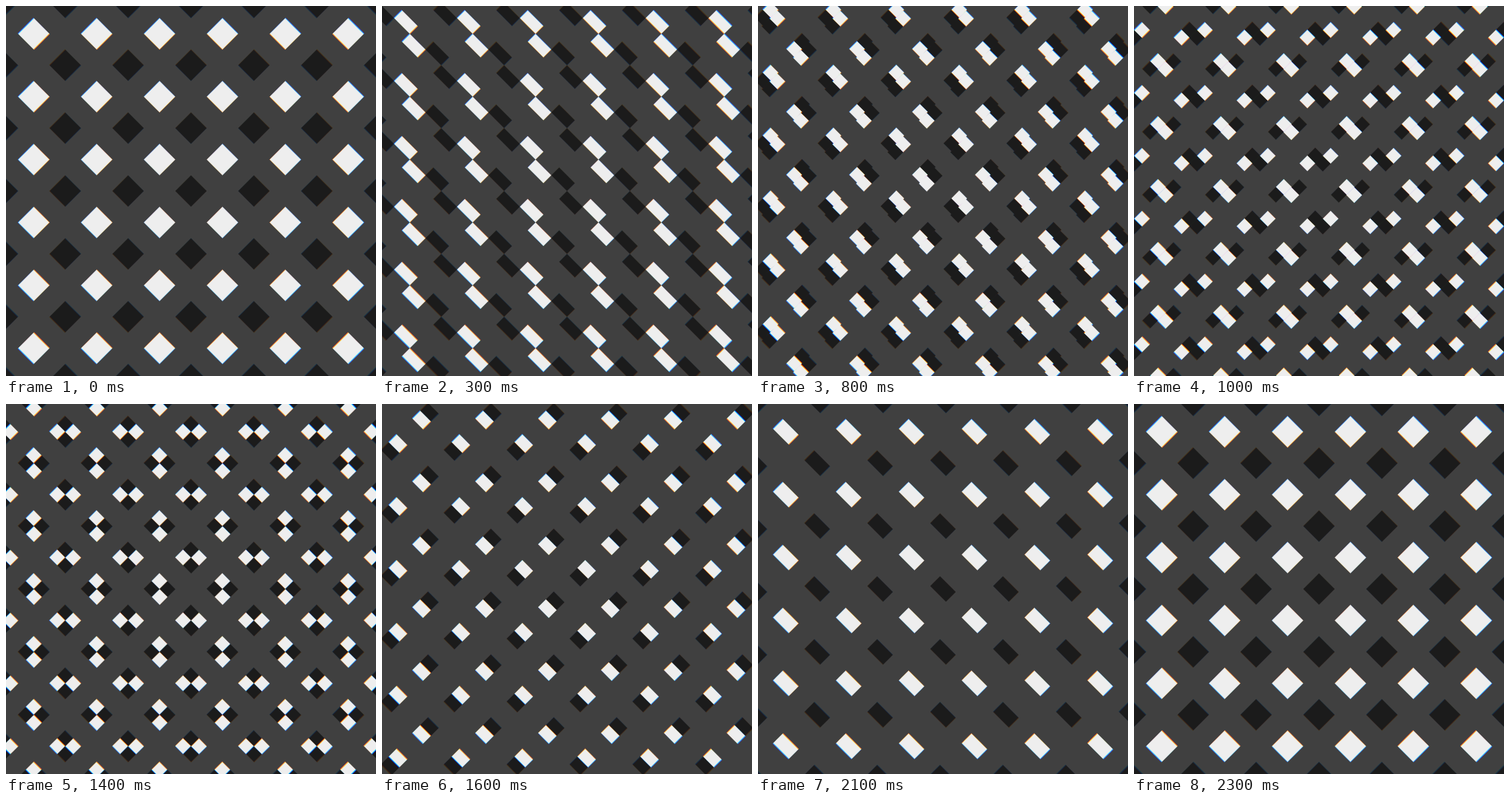
Recreate the animation shown at these times as an HTML page with a canvas. Size 500 by 500 pixels, loop 2400 ms.

```html
<!DOCTYPE html>
<html lang="en">
<head>
<meta charset="utf-8">
<title>Shifting squares</title>
<style>
  html, body { margin: 0; width: 100%; height: 100%; overflow: hidden; background: #404040; }
  canvas { display: block; width: 500px; height: 500px; }
</style>
</head>
<body>
<canvas id="stage" width="500" height="500"></canvas>
<script>
const ctx = document.getElementById('stage').getContext('2d');
const LOOP = 2400, STEP = 100;
const UNIT = 10.625 * Math.SQRT2;   // side of a quarter square
const REACH = 8;                    // lattice cells each way from the middle

// Each phase: start and end, in steps
const PHASES = [[0, 6], [6.5, 12.5], [13, 18.5], [18.5, 23]];

// Slight lens fringe: red shrinks and blue grows around the stage centre
const CHANNELS = [
  { light: '#ee0000', dark: '#1bffff', zoom: 0.9975 },
  { light: '#00ee00', dark: '#ff1bff', zoom: 1 },
  { light: '#0000ee', dark: '#ffff1b', zoom: 1.0025 }
];

function ease(u) {
  u = Math.min(1, Math.max(0, u));
  return u < 0.5 ? 8 * u ** 4 : 1 - 8 * (1 - u) ** 4;
}

// Offset of a quarter by its side (sx, sy) within the square:
// two shears, then two splits
function offset(sx, sy, step) {
  const [d1, d2, d3, d4] = PHASES.map(([a, b]) => 2 * ease((step - a) / (b - a)));
  return [sx * d3 - sy * d1, sy * d4 - sx * d2];
}

function buildPaths(step) {
  const paths = [new Path2D(), new Path2D()];
  for (const sx of [-1, 1]) {
    for (const sy of [-1, 1]) {
      const [dx, dy] = offset(sx, sy, step);
      for (let i = -REACH; i <= REACH; i++) {
        for (let j = -REACH; j <= REACH; j++) {
          const x = 4 * i + sx / 2 + dx, y = 4 * j + sy / 2 + dy;
          paths[Math.abs(i + j) % 2].rect(x - 0.5, y - 0.5, 1, 1);
        }
      }
    }
  }
  return paths;
}

function fill(path, color, mode) {
  ctx.globalCompositeOperation = mode;
  ctx.fillStyle = color;
  ctx.fill(path);
}

function draw(step) {
  const [light, dark] = buildPaths(step);
  ctx.setTransform(1, 0, 0, 1, 0, 0);
  ctx.globalCompositeOperation = 'source-over';
  ctx.fillStyle = '#404040';
  ctx.fillRect(0, 0, 500, 500);
  for (const c of CHANNELS) {
    ctx.setTransform(c.zoom, 0, 0, c.zoom, 250, 250);
    ctx.translate(-42.5, -42.5);
    ctx.rotate(Math.PI / 4);
    ctx.scale(UNIT, -UNIT);
    fill(dark, c.dark, 'darken');
    fill(light, c.light, 'lighten');
  }
}

const start = performance.now();
let shown = -1;

function tick() {
  const step = Math.floor(((performance.now() - start) % LOOP) / STEP);
  if (step !== shown) draw(shown = step);
  requestAnimationFrame(tick);
}
tick();
</script>
</body>
</html>
```
